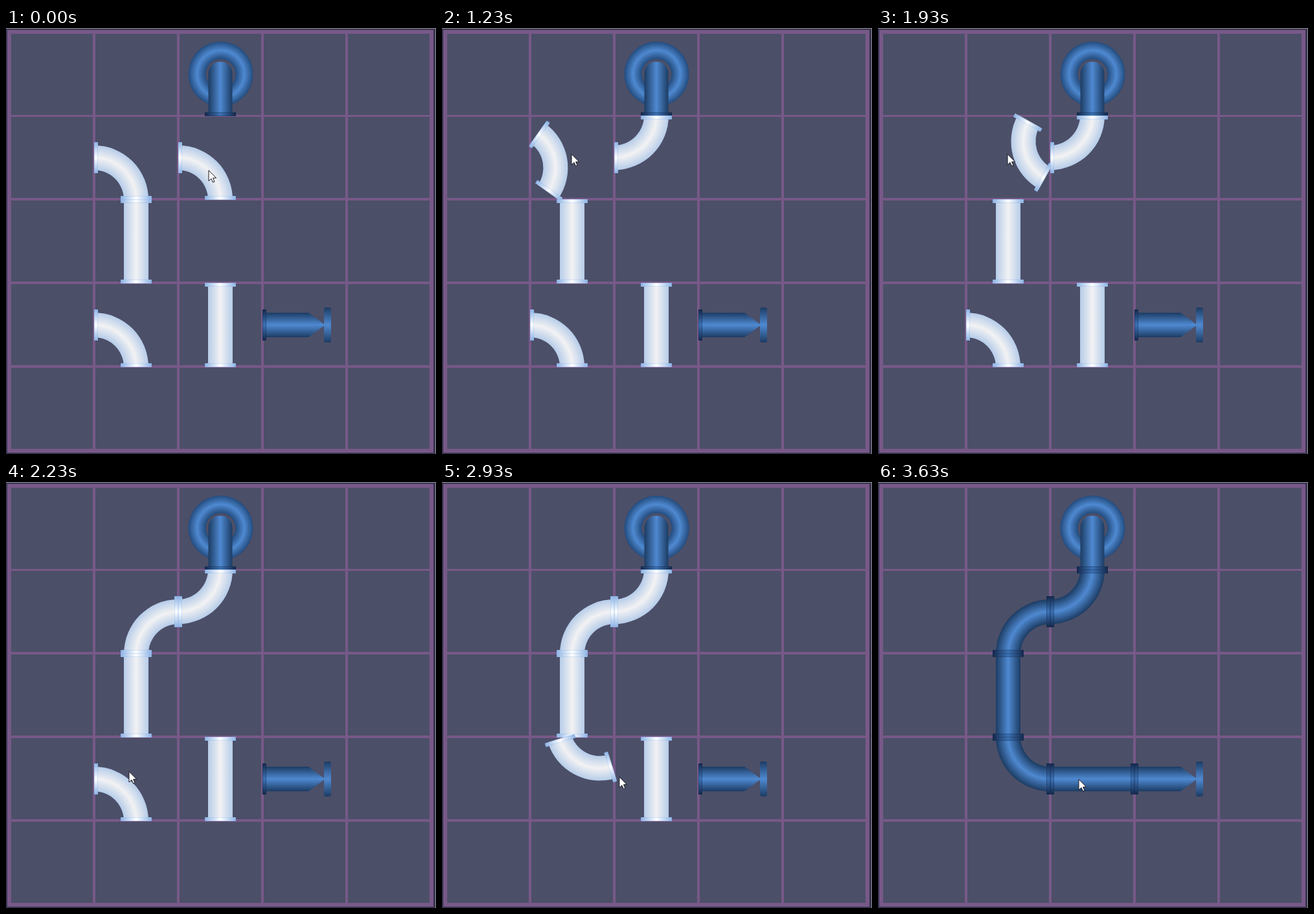
An HTML page with a canvas for the animation above (4.68 s loop, 664 by 657 pixels).

```html
<!DOCTYPE html>
<html lang="en">
<head>
<meta charset="utf-8">
<title>Pipe puzzle</title>
<style>
html, body { margin: 0; width: 100%; height: 100%; overflow: hidden; background: #4c4f68; }
canvas { display: block; width: 664px; height: 657px; }
</style>
</head>
<body>
<canvas id="stage" width="664" height="657"></canvas>
<script>
const ctx = document.getElementById('stage').getContext('2d');
const LOOP = 4680, TURN = 400, LAG = 36, SOLVED = 3282;
const HALF = 65, BORE = 19, RIM = 24, LIP = 6;

const EMPTY = { edge: '#b6cce9', mid: '#f2f2f3', rim: '#8cb3e5', hub: '#ffffff' };
const WATER = { edge: '#1c3c63', mid: '#4f89d1', rim: '#14284a', hub: '#3b72b5' };

// Pieces in paint order; turns are click times, each adding a quarter turn.
const pieces = [
  { x: 201, y: 200, draw: bend, turns: [1134, 1490, 1846] },
  { x: 331, y: 200, draw: bend, turns: [551] },
  { x: 201, y: 329, draw: straight, turns: [] },
  { x: 201, y: 458, draw: bend, turns: [2328, 2729] },
  { x: 331, y: 458, draw: straight, turns: [3246] }
];

const pointerStart = [313, 219];
const moves = [
  { from: 690, to: 887, x: 200, y: 194 },
  { from: 2000, to: 2215, x: 190, y: 446 },
  { from: 2800, to: 3006, x: 310, y: 458 }
];

const clamp = v => Math.max(0, Math.min(1, v));
const smooth = v => v * v * (3 - 2 * v);

// cubic-bezier(.25, .1, .25, 1)
function ease(p) {
  if (p <= 0 || p >= 1) return clamp(p);
  let lo = 0, hi = 1;
  for (let i = 0; i < 20; i++) {
    const u = (lo + hi) / 2;
    if (0.75 * u * (1 - u) + u ** 3 < p) lo = u; else hi = u;
  }
  const v = 1 - lo;
  return 0.3 * lo * v * v + 3 * lo * lo * v + lo ** 3;
}

function shade(g, edge, mid) {
  g.addColorStop(0, edge);
  g.addColorStop(0.5, mid);
  g.addColorStop(1, edge);
  return g;
}

const across = (r, edge, mid) => shade(ctx.createLinearGradient(-r, 0, r, 0), edge, mid);

function at(x, y, angle, paint) {
  ctx.save();
  ctx.translate(x, y);
  ctx.rotate(angle);
  paint();
  ctx.restore();
}

function box(x, y, w, h, r, fill) {
  ctx.beginPath();
  ctx.roundRect(x, y, w, h, r);
  ctx.fillStyle = fill;
  ctx.fill();
}

function ring(x, y, inner, outer, from, to, edge, mid) {
  ctx.beginPath();
  ctx.arc(x, y, outer, from, to);
  ctx.arc(x, y, inner, to, from, true);
  ctx.fillStyle = shade(ctx.createRadialGradient(x, y, inner, x, y, outer), edge, mid);
  ctx.fill();
}

// Flange along the lower side of a cell
function flange(c) {
  box(-RIM, HALF - LIP, RIM * 2, LIP, 1, across(RIM, c.rim, c.hub));
  ctx.globalAlpha = 0.35;
  ctx.lineWidth = 1;
  ctx.strokeStyle = c.rim;
  ctx.strokeRect(-RIM + 0.5, HALF - LIP + 0.5, RIM * 2 - 1, LIP - 1);
  ctx.globalAlpha = 1;
}

function bend(c) {
  ring(-HALF, HALF, HALF - BORE, HALF + BORE, -Math.PI / 2, 0, c.edge, c.mid);
  flange(c);
  at(0, 0, Math.PI / 2, () => flange(c));
}

function straight(c) {
  box(-BORE, -HALF + 1, BORE * 2, HALF * 2 - 2, 0, across(BORE, c.edge, c.mid));
  flange(c);
  at(0, 0, Math.PI, () => flange(c));
}

function spring() {
  ring(0.5, 0, 23, 50, 0, Math.PI * 2, '#234c7e', WATER.mid);
  box(-18.5, -19, 37, 80, [18, 18, 0, 0], across(18.5, WATER.edge, WATER.mid));
  flange(WATER);
}

function valve() {
  const fill = across(BORE, WATER.edge, WATER.mid);
  ctx.beginPath();
  ctx.moveTo(-BORE, 60);
  ctx.lineTo(-BORE, -6);
  ctx.lineTo(0, -32);
  ctx.lineTo(BORE, -6);
  ctx.lineTo(BORE, 60);
  ctx.fillStyle = fill;
  ctx.fill();
  box(-27, -41, 54, 11, 3, across(27, WATER.edge, WATER.mid));
  flange(WATER);
}

function board() {
  ctx.fillStyle = '#37344d';
  ctx.fillRect(0, 0, 664, 657);
  ctx.fillStyle = '#8f8f99';
  ctx.fillRect(0, 0, 664, 1);
  ctx.fillRect(663, 0, 1, 657);
  ctx.fillStyle = '#775988';
  ctx.fillRect(2, 3, 658, 652);
  ctx.fillStyle = '#4c4f68';
  for (let row = 0; row < 5; row++) {
    for (let col = 0; col < 5; col++) {
      ctx.fillRect(8 + col * 130, Math.round(8.5 + row * 128.8), 126, 125);
    }
  }
}

function pointer(t) {
  let [x, y] = pointerStart;
  for (const m of moves) {
    const k = smooth(clamp((t - m.from) / (m.to - m.from)));
    x += (m.x - x) * k;
    y += (m.y - y) * k;
  }
  at(x, y, 0, () => {
    ctx.beginPath();
    ctx.moveTo(0, 0.5);
    for (const [px, py] of [[0, 17], [4, 13.4], [6.6, 19], [9, 18], [6.6, 12.4], [11.6, 12.2]]) ctx.lineTo(px, py);
    ctx.closePath();
    ctx.fillStyle = '#fff';
    ctx.fill();
    ctx.lineWidth = 1;
    ctx.strokeStyle = '#15151c';
    ctx.stroke();
  });
}

function angleOf(piece, t) {
  const quarters = piece.turns.reduce((sum, start) =>
    sum + (t < start + LAG ? 0 : ease((t - start) / TURN)), 0);
  return quarters * Math.PI / 2;
}

function render(t) {
  const look = t < SOLVED ? EMPTY : WATER;
  board();
  at(331, 71, 0, spring);
  for (const p of pieces) at(p.x, p.y, angleOf(p, t), () => p.draw(look));
  at(461, 458, Math.PI / 2, valve);
  pointer(t);
}

const begin = performance.now();
function tick() {
  render((performance.now() - begin) % LOOP);
  requestAnimationFrame(tick);
}
tick();
</script>
</body>
</html>
```
